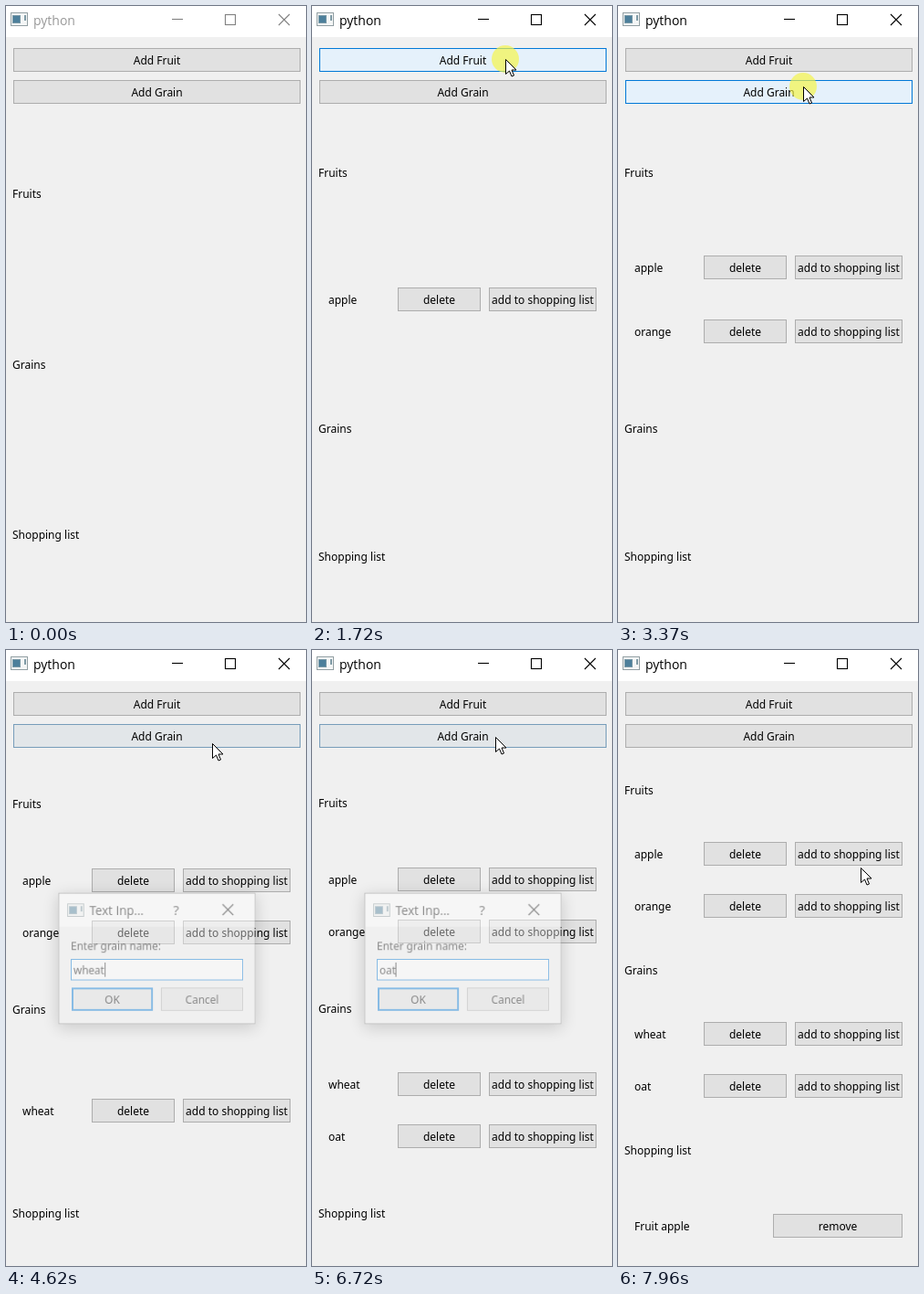
Recreate the animation shown at these times as an HTML page with a canvas. Size 329 by 674 pixels, loop 7990 ms.

```html
<!DOCTYPE html>
<html lang="en">
<head>
<meta charset="utf-8">
<style>
  html, body { margin: 0; width: 100%; height: 100%; overflow: hidden; background: #f0f0f0; }
  canvas { position: absolute; display: block; }
  #main { left: 0; top: 0; }
  #dialog { left: 55px; top: 264px; box-shadow: 0 4px 17px rgba(0, 0, 0, .38); }
</style>
</head>
<body>
<canvas id="main" width="329" height="674"></canvas>
<canvas id="dialog" width="221" height="147"></canvas>
<script>
const LOOP = 7990;
const BLUE = '#0078d7';
const dialogCanvas = document.getElementById('dialog');
const main = document.getElementById('main').getContext('2d');
const dlg = dialogCanvas.getContext('2d');

const items = ['apple', 'orange', 'wheat', 'oat'];
// Start time, heading centres, item row centres
const layouts = [
  [0, [205, 392, 578], []],
  [1190, [182, 462, 602], [321]],
  [2450, [182, 462, 602], [286, 356]],
  [4590, [168, 393, 616], [252, 309, 504]],
  [6690, [167, 392, 616], [251, 308, 475, 532]],
  [7760, [153, 350, 547], [223, 280, 420, 477]],
];
const dialogs = [
  { open: 560, close: 1190, kind: 'fruit', word: 'apple', keys: [850, 900, 980, 1040, 1110], blink: 1110 },
  { open: 1810, close: 2450, kind: 'fruit', word: 'orange', keys: [2010, 2060, 2110, 2160, 2210, 2260], blink: 2260 },
  { open: 3450, close: 4590, kind: 'grain', word: 'wheat', keys: [3590, 3670, 3750, 3830, 3910], blink: 3910 },
  { open: 5700, close: 6690, kind: 'grain', word: 'oat', keys: [5930, 6010, 6160], blink: 6190 },
];
const clicks = [470, 1720, 3350, 5610, 7660];
const hovers = {
  fruit: [[400, 560], [1190, 1800], [2450, 3200]],
  grain: [[3230, 3450], [4590, 5700], [6690, 7190]],
  shop: [[7550, 7850]],
};
const path = [
  [100, 238, 690], [450, 212, 58], [3090, 212, 58], [3330, 203, 88], [3440, 203, 88], [3620, 226, 102],
  [4910, 226, 102], [5130, 201, 95], [7090, 201, 95], [7620, 266, 240], [7880, 266, 240], [7940, 266, 238],
];

const clamp = v => Math.max(0, Math.min(1, v));
const smooth = v => v * v * (3 - 2 * v);
const mix = (a, b, k) => `rgb(${a.map((v, i) => Math.round(v + (b[i] - v) * k))})`;

function text(c, str, x, y, { size = 12, font = 'Noto Sans', align = 'left', color = '#000' } = {}) {
  c.font = `${size}px "${font}", sans-serif`;
  c.textAlign = align;
  c.fillStyle = color;
  c.fillText(str, x, y);
}

function box(c, x, y, w, h, fill, border, line = 1) {
  c.fillStyle = border;
  c.fillRect(x, y, w, h);
  c.fillStyle = fill;
  c.fillRect(x + line, y + line, w - 2 * line, h - 2 * line);
}

function button(c, label, x, y, w, hover = 0, pressed = false) {
  const fill = pressed ? '#cce4f7' : mix([225, 225, 225], [229, 241, 251], hover);
  const border = pressed ? '#005499' : mix([173, 173, 173], [0, 120, 215], hover);
  box(c, x, y, w, 26, fill, border);
  text(c, label, x + w / 2, y + 18, { align: 'center' });
}

function lines(c, color, ...segments) {
  c.strokeStyle = color;
  c.lineWidth = 1.1;
  c.beginPath();
  for (const [x1, y1, x2, y2] of segments) {
    c.moveTo(x1, y1);
    c.lineTo(x2, y2);
  }
  c.stroke();
}

const cross = (c, color, x, y) =>
  lines(c, color, [x - 6, y - 6, x + 6, y + 6], [x + 6, y - 6, x - 6, y + 6]);

function windowIcon(c, x, y) {
  box(c, x, y, 19, 15, '#f4f6f6', '#929fa3');
  box(c, x + 2, y + 3, 9, 9, '#4c7f9b', '#7898a6');
  c.fillStyle = '#7f9aa5';
  c.fillRect(x + 15, y + 3, 2, 6);
}

function hoverLevel(name, t) {
  return Math.max(...hovers[name].map(([a, b]) => clamp(Math.min((t - a) / 100, (b + 100 - t) / 100))));
}

function cursorAt(t) {
  const next = path.findIndex(p => p[0] > t);
  if (next === 0) return path[0].slice(1);
  if (next < 0) return path[path.length - 1].slice(1);
  const [t0, x0, y0] = path[next - 1], [t1, x1, y1] = path[next];
  const k = smooth((t - t0) / (t1 - t0));
  return [x0 + (x1 - x0) * k, y0 + (y1 - y0) * k];
}

function drawCursor(x, y, clicked) {
  const c = main;
  if (clicked) {
    c.fillStyle = 'rgba(245, 245, 70, .68)';
    c.beginPath();
    c.arc(x, y, 15, 0, 7);
    c.fill();
  }
  c.save();
  c.translate(x + .5, y + .5);
  c.beginPath();
  for (const [px, py] of [[0, 0], [0, 16], [4, 12.5], [6.5, 18.5], [9, 17.5], [6.5, 11.5], [11.5, 11.5]]) c.lineTo(px, py);
  c.closePath();
  c.fillStyle = '#fff';
  c.fill();
  c.strokeStyle = '#000';
  c.lineWidth = 1;
  c.stroke();
  c.restore();
}

function drawMain(t, active) {
  const c = main;
  const [, heads, rows] = layouts.filter(l => l[0] <= t).pop();
  const click = clicks.findIndex(k => t >= k && t < k + 90);
  const pressed = click >= 0 && t >= clicks[click] + 35;
  const ink = active ? '#000' : '#808080';

  c.fillStyle = '#f0f0f0';
  c.fillRect(0, 0, 329, 674);
  c.fillStyle = '#fff';
  c.fillRect(0, 0, 329, 34);
  windowIcon(c, 5, 7);
  text(c, 'python', 30, 21, { size: 14, font: 'Open Sans', color: active ? '#000' : '#999' });
  lines(c, ink, [182, 14.5, 194, 14.5]);
  c.strokeRect(240.5, 9.5, 11, 11);
  cross(c, ink, 305, 15);

  button(c, 'Add Fruit', 8, 46, 315, hoverLevel('fruit', t), pressed && click < 2);
  button(c, 'Add Grain', 8, 81, 315, hoverLevel('grain', t), pressed && (click === 2 || click === 3));
  ['Fruits', 'Grains', 'Shopping list'].forEach((h, i) => text(c, h, 7, heads[i] + 5));
  rows.forEach((y, i) => {
    text(c, items[i], 18, y + 5);
    button(c, 'delete', 94, y - 13, 91);
    button(c, 'add to shopping list', 194, y - 13, 118, i ? 0 : hoverLevel('shop', t), pressed && click === 4 && !i);
  });
  if (t >= 7760) {
    text(c, 'Fruit apple', 18, 635);
    button(c, 'remove', 170, 617, 142);
  }
  drawCursor(...cursorAt(t), click >= 0);
}

function drawDialog(t) {
  const d = dialogs.find(d => t >= d.open && t < d.close + 90);
  dialogCanvas.style.display = d ? 'block' : 'none';
  if (!d) return;
  const c = dlg;
  const opening = clamp((t - d.open) / 110);
  const closing = clamp((t - d.close) / 90);
  dialogCanvas.style.opacity = opening * (1 - closing) ** 2;
  dialogCanvas.style.transform = `scale(${(.9 + .1 * smooth(opening)) * (1 - .06 * closing)})`;

  box(c, 0, 0, 221, 147, '#f0f0f0', '#707070');
  c.fillStyle = '#fff';
  c.fillRect(1, 1, 219, 37);
  windowIcon(c, 10, 12);
  text(c, 'Text Inp...', 35, 25, { size: 13.6, font: 'Open Sans' });
  text(c, '?', 132, 25, { size: 15, font: 'Open Sans', align: 'center' });
  cross(c, '#000', 190, 19);
  text(c, `Enter ${d.kind} name:`, 14, 64);

  const typed = d.word.slice(0, d.keys.filter(k => k <= t).length);
  box(c, 14, 74, 193, 24, '#fff', BLUE);
  text(c, typed, 17, 91);
  const caretOn = t < d.blink || t >= d.close || Math.floor((t - d.blink) / 200) % 2 === 0;
  if (caretOn) c.fillRect(Math.round(17 + c.measureText(typed).width), 78, 1, 16);

  box(c, 15, 106, 91, 26, '#e1e1e1', BLUE, 2);
  text(c, 'OK', 60.5, 124, { align: 'center' });
  button(c, 'Cancel', 115, 106, 92);
}

function frame(now) {
  const t = now % LOOP;
  const modal = dialogs.some(d => t >= d.open && t < d.close);
  drawMain(t, t >= clicks[0] && !modal);
  drawDialog(t);
  requestAnimationFrame(frame);
}
requestAnimationFrame(frame);
</script>
</body>
</html>
```
